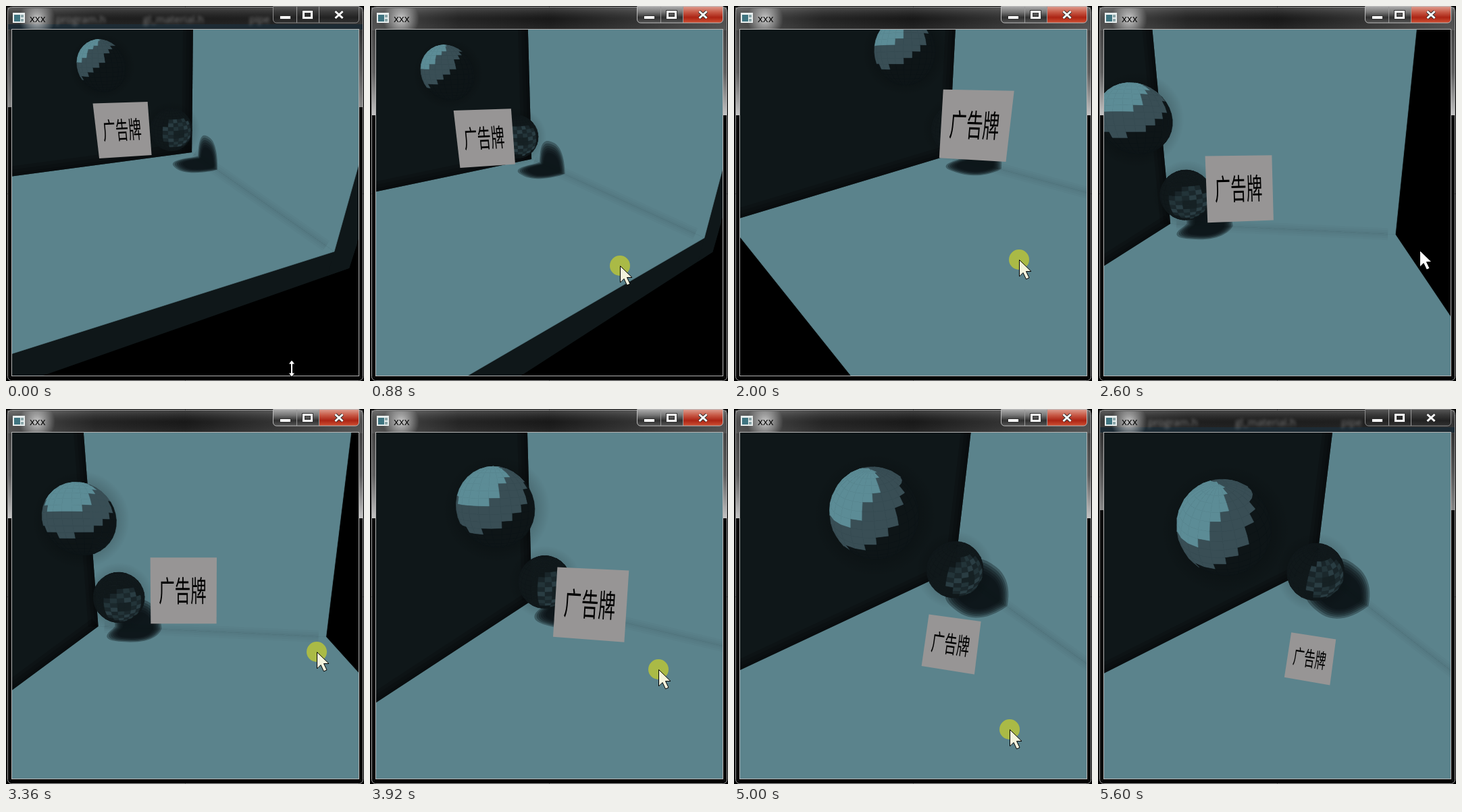
Write an HTML page with a canvas that moves like this. It is 530 px wide and 556 px high and loops after 5680 ms.

```html
<!DOCTYPE html>
<html lang="zh">
<head>
<meta charset="utf-8">
<title>xxx</title>
<style>
html, body { margin: 0; width: 100%; height: 100%; overflow: hidden; background: #000; }
canvas { display: block; }
</style>
</head>
<body>
<canvas id="stage" width="530" height="556"></canvas>
<script>
const ctx = document.getElementById('stage').getContext('2d');
const LOOP = 5680, STEP = 40;
const VIEW = { x: 9, y: 35, size: 513, cx: 266, cy: 292, focal: 443.4 };
const ROOM = 10, HEIGHT = 12, SLAB = 0.9;
const LIGHT = [-0.04, 0.76, 0.65];
const BLUE = '#5b838c', DARK = '#0f1719';
const SMALL = { c: [1.8, 1.84, 1.86], r: 0.95 };
const SIGN = { c: [4.68, 2.74, 4.65], size: 1.82 };

// Camera path: time, x, y, z, yaw, pitch
const PATH = [
  [400, 14.76, 5.2, 6.67, -66.9, 27.4],
  [880, 13.63, 5.05, 8.55, -54.3, 25.8],
  [2000, 9.39, 4.31, 11.35, -46.5, 25.5],
  [2600, 6.84, 4.37, 12.38, -8.3, 14.3],
  [3360, 5.84, 4.34, 12.5, -8, 14.3],
  [4560, 8.31, 7.2, 8.52, -54.3, 37.5],
  [5280, 7.22, 8.4, 7.42, -53.6, 47]
];
// Mouse path: time, x, y
const POINTER = [
  [0, 423, 537], [440, 370, 385], [880, 370, 385], [2000, 422, 376],
  [2600, 476, 362], [3360, 460, 360], [4560, 390, 416], [5520, 430, 545]
];

const clamp = (v, lo = 0, hi = 1) => Math.min(hi, Math.max(lo, v));
const dot = (a, b) => a[0] * b[0] + a[1] * b[1] + a[2] * b[2];
const sub = (a, b) => a.map((v, i) => v - b[i]);
const mix = (a, b, k) => a.map((v, i) => v + (b[i] - v) * k);
const cross = (a, b) => [a[1] * b[2] - a[2] * b[1], a[2] * b[0] - a[0] * b[2], a[0] * b[1] - a[1] * b[0]];

// Time with the rests between drags taken out
const moving = t => t - clamp(t - 280, 0, 160) - clamp(t - 3040, 0, 160);

function sample(keys, t, warp = v => v) {
  const at = clamp(warp(t), warp(keys[0][0]), warp(keys[keys.length - 1][0]));
  const i = Math.max(1, keys.findIndex(k => warp(k[0]) >= at));
  const a = warp(keys[i - 1][0]), b = warp(keys[i][0]);
  return mix(keys[i - 1], keys[i], (at - a) / (b - a)).slice(1);
}

// The big ball drifts slowly along a shallow arc
function bigBall(t) {
  const s = clamp(moving(t), 280, 4960) / 1000;
  return { c: [0.5 + 0.47 * s - 0.033 * s * s, 4.5 + 0.012 * s * s, 4 + 0.13 * (s - 2.2) ** 2], r: 1 };
}

let cam;
function setCamera(pos, yawDeg, pitchDeg) {
  const yaw = yawDeg * Math.PI / 180, pitch = pitchDeg * Math.PI / 180;
  const s = Math.sin(yaw), c = Math.cos(yaw), sp = Math.sin(pitch), cp = Math.cos(pitch);
  cam = { pos, right: [c, 0, s], up: [s * sp, cp, -c * sp], fwd: [s * cp, -sp, -c * cp] };
}
function toCamera(p) {
  const d = sub(p, cam.pos);
  return [dot(d, cam.right), dot(d, cam.up), dot(d, cam.fwd)];
}
const toScreen = p => [VIEW.cx + VIEW.focal * p[0] / p[2], VIEW.cy - VIEW.focal * p[1] / p[2]];

function clipNear(points, near = 0.1) {
  const out = [];
  points.forEach((p, i) => {
    const q = points[(i + 1) % points.length];
    if (p[2] >= near) out.push(p);
    if ((p[2] >= near) !== (q[2] >= near)) out.push(mix(p, q, (near - p[2]) / (q[2] - p[2])));
  });
  return out;
}
const project = points => clipNear(points.map(toCamera)).map(toScreen);

function trace(points) {
  ctx.beginPath();
  points.forEach(p => ctx.lineTo(p[0], p[1]));
  ctx.closePath();
}
function face(points, color, seam = false) {
  trace(project(points));
  ctx.fillStyle = color;
  ctx.fill();
  if (seam) {
    ctx.strokeStyle = color;
    ctx.lineWidth = 0.7;
    ctx.stroke();
  }
}
function softEdge(a, b, width, alpha) {
  trace(project([a, b]));
  ctx.strokeStyle = `rgba(0,0,0,${alpha})`;
  for (let k = 1; k <= 3; k++) {
    ctx.lineWidth = width * k / 3;
    ctx.stroke();
  }
}

function drawRoom() {
  const W = ROOM, H = HEIGHT;
  if (cam.pos[0] > W) {
    face([[W, 0, W], [W, 0, -SLAB], [W, -SLAB, -SLAB], [W, -SLAB, W]], DARK);
    face([[W, -SLAB, 0], [W, H, 0], [W, H, -SLAB], [W, -SLAB, -SLAB]], DARK);
  }
  face([[0, 0, 0], [W, 0, 0], [W, H, 0], [0, H, 0]], BLUE, true);
  face([[0, 0, 0], [W, 0, 0], [W, 0, W], [0, 0, W]], BLUE, true);
  softEdge([0.3, 0, 0], [W - 0.3, 0, 0], 18, 0.022);
  ctx.save();
  face([[0, 0, 0], [0, 0, W], [0, H, W], [0, H, 0]], DARK);
  ctx.clip();
  softEdge([0, 0, 0], [0, 0, W], 30, 0.16);
  softEdge([0, 0, 0], [0, H, 0], 30, 0.16);
  ctx.restore();
}

// Blocky layered shadow that folds from the floor up onto the back wall
function drawShadow({ c, r }) {
  const square = v => Math.sign(v) * Math.abs(v) ** 0.75;
  for (let layer = 0; layer < 6; layer++) {
    const size = r * (1.16 - layer * 0.08), pts = [];
    for (let i = 0; i < 48; i++) {
      const a = i / 48 * Math.PI * 2;
      const u = size * square(Math.cos(a)), v = size * square(Math.sin(a));
      const p = [c[0] + u, c[1] + v * LIGHT[2], c[2] - v * LIGHT[1]];
      const reach = Math.min(p[1] / LIGHT[1], p[2] / LIGHT[2]);
      pts.push(p.map((w, k) => w - LIGHT[k] * reach));
    }
    face(pts, 'rgba(8,14,16,0.33)');
  }
}

function drawHalo({ c, r }, alpha) {
  const p = toCamera(c), [x, y] = toScreen(p), size = VIEW.focal * r / p[2];
  const g = ctx.createRadialGradient(x, y, size * 0.9, x, y, size * 1.4);
  g.addColorStop(0, `rgba(0,0,0,${alpha})`);
  g.addColorStop(1, 'rgba(0,0,0,0)');
  box(x - size * 1.5, y - size * 1.5, size * 3, size * 3, g);
}

const ROWS = 18, COLS = 24;
function normal(row, col) {
  const a = row / ROWS * Math.PI, b = col / COLS * Math.PI * 2;
  return [Math.sin(a) * Math.cos(b), Math.cos(a), Math.sin(a) * Math.sin(b)];
}
function drawBall({ c, r }, shade) {
  const at = (row, col) => normal(row, col).map((v, k) => c[k] + v * r);
  for (let i = 0; i < ROWS; i++) {
    for (let j = 0; j < COLS; j++) {
      const n = normal(i + 0.5, j + 0.5);
      if (dot(n, sub(cam.pos, at(i + 0.5, j + 0.5))) < 0) continue;
      face([at(i, j), at(i, j + 1), at(i + 1, j + 1), at(i + 1, j)], shade(n, i, j), true);
    }
  }
}
function toon(n) {
  const v = dot(n, LIGHT);
  return v > 0.74 ? '#5c8c96' : v > 0.24 ? '#394e55' : '#0e1517';
}
function mottled(n, row, col) {
  const glow = 0.4 * dot(n, cam.right) - 0.42 * dot(n, cam.up) - 0.81 * dot(n, cam.fwd);
  const grain = (row * 7 + col * 5) % 4;
  if (glow < 0.72) return '#10181a';
  if (glow > 0.97) return '#162124';
  return ['#1b282c', '#233439', '#192529', '#2a3d43'][grain];
}

// Billboard turned to the eye; its axes shrink when seen from above
function drawSign({ c, size }) {
  const away = sub(cam.pos, c), dist = Math.hypot(...away);
  const n = away.map(v => v / dist);
  const right = cross([0, 1, 0], n), up = cross(n, right);
  const corner = (u, v) => c.map((w, k) => w + size / 2 * (u * right[k] + v * up[k]));
  const quad = [corner(-1, 1), corner(1, 1), corner(1, -1), corner(-1, -1)];
  face(quad, '#979595');
  const [a, b, d, e] = project(quad);
  const axis = (p, q, r, s) => [0, 1].map(k => (q[k] - p[k] + s[k] - r[k]) / 200);
  const middle = [0, 1].map(k => (a[k] + b[k] + d[k] + e[k]) / 4);
  ctx.save();
  ctx.transform(...axis(a, b, e, d), ...axis(a, e, b, d), ...middle);
  ctx.scale(1, 1.85);
  ctx.fillStyle = '#000';
  ctx.font = '24px "Noto Sans CJK SC", "Noto Sans CJK", sans-serif';
  ctx.textAlign = 'center';
  ctx.fillText('广告牌', -1.5, 9.1);
  ctx.restore();
}

function drawPointer(t) {
  if (t >= 5520) return;
  const [x, y] = sample(POINTER, t);
  const pressed = (t >= 440 && t < 2520) || (t >= 3200 && t <= 5280);
  ctx.save();
  ctx.translate(Math.round(x), Math.round(y));
  if (pressed) {
    ctx.fillStyle = 'rgba(190,200,52,0.8)';
    ctx.beginPath();
    ctx.arc(0, 0, 15, 0, Math.PI * 2);
    ctx.fill();
  }
  ctx.lineWidth = 1;
  ctx.strokeStyle = '#000';
  ctx.fillStyle = pressed ? '#f3f3dc' : '#fff';
  if (t < 160) {
    trace([[0, -12], [5, -6], [1.5, -6], [1.5, 7], [5, 7], [0, 13], [-5, 7], [-1.5, 7], [-1.5, -6], [-5, -6]]);
  } else {
    trace([[0.5, 0.5], [0.5, 25], [6, 19.5], [10.5, 29], [15, 27], [10.5, 17.5], [18, 17.5]]);
  }
  ctx.fill();
  ctx.stroke();
  ctx.restore();
}

function gradient(x0, y0, x1, y1, ...colors) {
  const g = ctx.createLinearGradient(x0, y0, x1, y1);
  colors.forEach((c, i) => g.addColorStop(i / (colors.length - 1), c));
  return g;
}
function box(x, y, w, h, fill) {
  ctx.fillStyle = fill;
  ctx.fillRect(x, y, w, h);
}

function drawButtons(active) {
  const gray = active
    ? gradient(0, 1, 0, 25, '#aaa', '#777', '#303030', '#555')
    : gradient(0, 1, 0, 25, '#555', '#383838', '#222', '#303030');
  const red = gradient(0, 1, 0, 25, '#dc9a8c', '#c85a47', '#ac2414', '#cf5034');
  ctx.save();
  ctx.beginPath();
  ctx.roundRect(395.5, 0.5, 127, 24.5, [0, 0, 5, 5]);
  ctx.clip();
  box(396, 1, 67, 24, gray);
  box(464, 1, 58, 24, active ? red : gray);
  box(430, 1, 1, 24, '#999');
  box(463, 1, 1, 24, '#999');
  ctx.restore();
  ctx.strokeStyle = active ? '#bbb' : '#8c8c8c';
  ctx.lineWidth = 1;
  ctx.stroke();

  for (const [color, grow] of [['#333', 1], ['#fff', 0]]) {
    box(406 - grow, 15 - grow, 15 + 2 * grow, 4 + 2 * grow, color);
    ctx.strokeStyle = color;
    ctx.lineWidth = 3 + 2 * grow;
    ctx.strokeRect(440.5, 8.5, 12, 9);
    ctx.beginPath();
    ctx.moveTo(487.5, 8);
    ctx.lineTo(498.5, 18);
    ctx.moveTo(498.5, 8);
    ctx.lineTo(487.5, 18);
    ctx.stroke();
  }
}

function drawWindow(active) {
  box(0, 0, 530, 556, '#000');
  box(2, 2, 526, 34, active
    ? gradient(0, 0, 530, 0, '#606060', '#2b2b2b', '#1d1d1d', '#3c3c3c', '#606060')
    : gradient(0, 0, 530, 0, '#454545', '#242424', '#222', '#252525', '#3c3c3c'));
  box(2, 2, 526, 34, gradient(0, 2, 0, 36, 'rgba(160,160,160,.3)', 'rgba(0,0,0,.15)', 'rgba(70,70,70,.3)'));
  const cut = active ? 162 : 150;
  for (const x of [2, 523]) {
    box(x, 36, 6, cut - 36, active
      ? gradient(0, 36, 0, cut, '#454545', '#606060', '#c4c4c4')
      : gradient(0, 36, 0, cut, '#333', '#555', '#888'));
    box(x, cut, 6, 552 - cut, '#0a0a0a');
  }
  if (!active) {
    box(2, 27, 526, 8, '#1d2b34');
    ctx.save();
    ctx.filter = 'blur(2px)';
    ctx.fillStyle = 'rgba(190,190,190,.6)';
    ctx.font = '15px "Open Sans", sans-serif';
    ctx.fillText('program.h', 74, 25);
    ctx.fillText('gl_material.h', 203, 25);
    ctx.fillText('pipe', 360, 25);
    ctx.restore();
  }
  const glow = ctx.createRadialGradient(46, 19, 2, 46, 19, 27);
  glow.addColorStop(0, 'rgba(235,235,235,.75)');
  glow.addColorStop(1, 'rgba(235,235,235,0)');
  box(14, 3, 64, 32, glow);
  box(10, 10, 18, 15, '#e8eeee');
  box(12, 13, 9, 10, '#3f7480');
  box(22, 13, 4, 4, '#8ba5a8');
  box(22, 19, 4, 4, '#8ba5a8');
  ctx.fillStyle = '#000';
  ctx.font = '15px "Open Sans", sans-serif';
  ctx.fillText('xxx', 35, 24);

  ctx.lineWidth = 1;
  ctx.strokeStyle = '#a0a0a0';
  ctx.beginPath();
  ctx.roundRect(2.5, 1.5, 526, 554, 6);
  ctx.stroke();
  ctx.strokeStyle = '#b4b4b4';
  ctx.strokeRect(VIEW.x - 0.5, VIEW.y - 0.5, VIEW.size + 1, VIEW.size + 1);
  drawButtons(active);
}

function draw(t) {
  const active = clamp((t - 40) / 200) * clamp((5600 - t) / 160);
  drawWindow(false);
  ctx.globalAlpha = active;
  if (active > 0) drawWindow(true);
  ctx.globalAlpha = 1;

  const [x, y, z, yaw, pitch] = sample(PATH, t, moving);
  const big = bigBall(t);
  setCamera([x, y, z], yaw, pitch);
  ctx.save();
  ctx.beginPath();
  ctx.rect(VIEW.x, VIEW.y, VIEW.size, VIEW.size);
  ctx.clip();
  box(VIEW.x, VIEW.y, VIEW.size, VIEW.size, '#000');
  drawRoom();
  drawShadow(SMALL);
  drawHalo(SMALL, 0.15);
  drawHalo(big, 0.2);
  drawBall(big, toon);
  drawBall(SMALL, mottled);
  drawSign(SIGN);
  ctx.restore();
  drawPointer(t);
}

function tick(now) {
  draw(Math.floor(now % LOOP / STEP) * STEP);
  requestAnimationFrame(tick);
}
requestAnimationFrame(tick);
</script>
</body>
</html>
```
